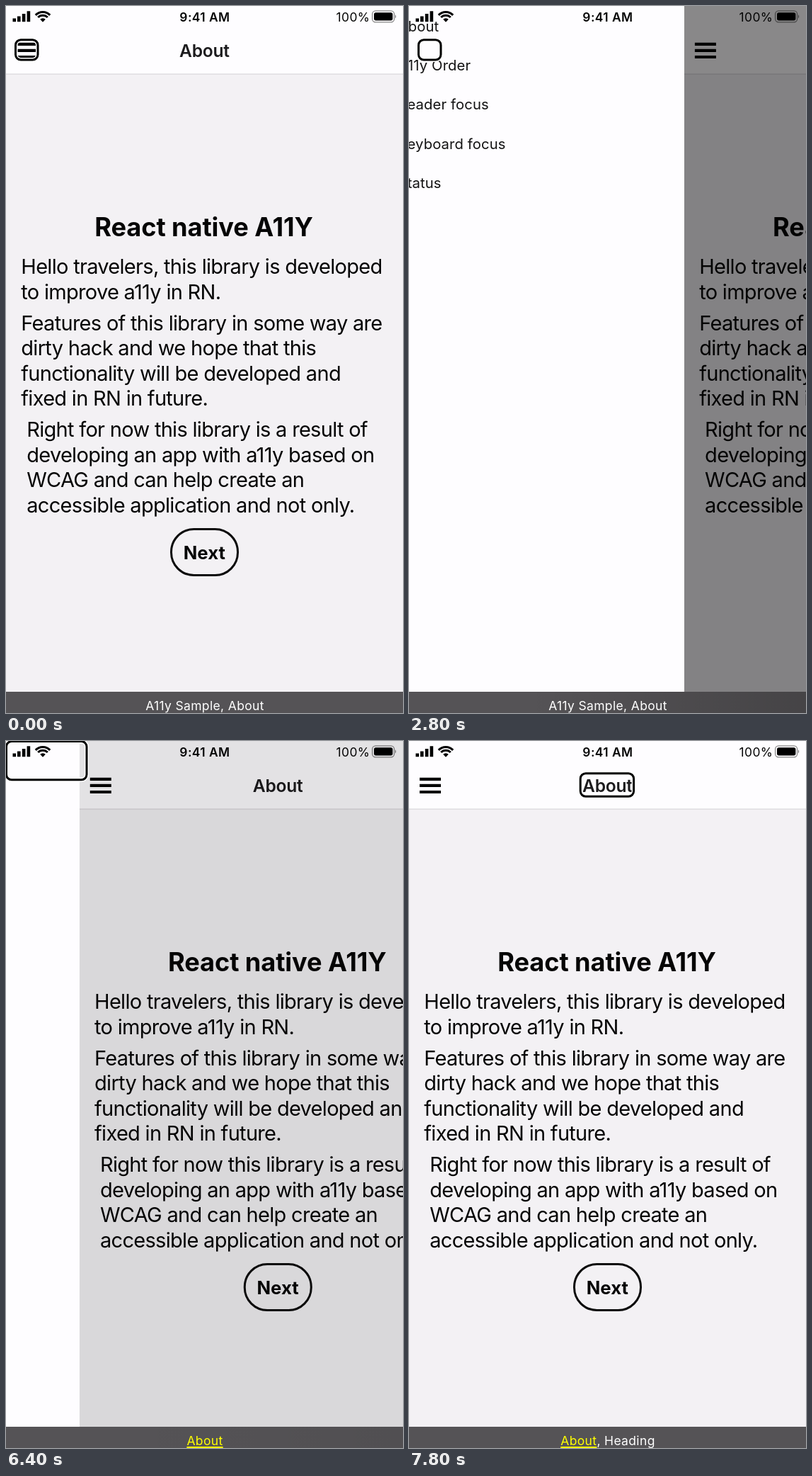
An HTML page for the animation above (8000 ms loop, 561 px wide and 998 px high).

```html
<!DOCTYPE html>
<html lang="en">
<head>
<meta charset="utf-8">
<title>Drawer menu with screen reader</title>
<style>
  html, body { margin: 0; width: 100%; height: 100%; overflow: hidden; }
  body { position: relative; font-family: Inter, Roboto, sans-serif; font-optical-sizing: none; }
  svg { position: absolute; left: 0; top: 0; width: 561px; height: 998px; }
  text { fill: #050505; }
  .mid { text-anchor: middle; }
  .title { font-size: 36.2px; font-weight: 700; letter-spacing: -.08px; }
  .head { font-size: 24.6px; font-weight: 600; letter-spacing: -.3px; fill: #1c1b1d; }
  .next { font-size: 25.7px; font-weight: 700; }
  .body { font-size: 29px; letter-spacing: -.7px; }
  .item { font-size: 20.3px; letter-spacing: .1px; fill: #141414; }
  .status { font-size: 17.4px; letter-spacing: .42px; }
  #bar {
    position: absolute; left: 0; top: 968px; width: 561px; height: 30px; overflow: hidden;
    background: #555356; color: #fff; text-align: center;
    font-size: 17.5px; line-height: 40px; letter-spacing: .35px;
  }
  #shade { position: absolute; inset: 0; background: linear-gradient(90deg, #0000 30%, #0003); }
  #caption { position: relative; left: .5px; white-space: pre; }
  u {
    color: #ff0; text-decoration-thickness: 1.5px;
    text-underline-offset: 1.5px; text-decoration-skip-ink: none;
  }
</style>
</head>
<body>
<svg viewBox="0 0 561 998">
  <rect width="561" height="998" fill="#fefdff"/>
  <g id="page">
    <rect width="561" height="998" fill="#f3f1f4"/>
    <rect width="561" height="96" fill="#fefdff"/>
    <rect y="95.5" width="561" height="1.2" fill="#dad8dc"/>
    <path d="M15 53.8h30M15 62.9h30M15 72h30" stroke="#000" stroke-width="4.2"/>
    <text class="mid head" x="280.3" y="72">About</text>
    <text class="mid title" x="279.5" y="325">React native A11Y</text>
    <g id="copy"></g>
    <rect x="233.5" y="738.5" width="94" height="65" rx="32" fill="none" stroke="#0a0a0a" stroke-width="3"/>
    <text class="mid next" x="280.3" y="781">Next</text>
    <rect id="dim" width="561" height="998"/>
  </g>
  <g id="drawer">
    <rect width="418.5" height="998" fill="#fefdff"/>
  </g>
  <g id="ring" fill="none">
    <rect rx="7.5" stroke="#fff" stroke-width="6"/>
    <rect rx="7.5" stroke="#000" stroke-width="3"/>
  </g>
  <g id="status">
    <path d="M9.5 17.6h4.6v4.6h-4.6zM16 14.6h4.6v7.6h-4.6zM22.8 11h4.6v11.2h-4.6zM29.6 7.3h4.6v14.9h-4.6z"/>
    <g fill="none" stroke="#000" stroke-width="3">
      <path d="M41.8 12.9a14 14 0 0 1 20.4 0M45.2 16.1a9.3 9.3 0 0 1 13.6 0"/>
    </g>
    <path d="M52 22.8l-3.8-4a5.3 5.3 0 0 1 7.6 0z"/>
    <text class="mid status" x="280.9" y="21.5" font-weight="600">9:41 AM</text>
    <text class="status" x="466.5" y="21.5">100%</text>
    <rect x="517.6" y="6.8" width="31" height="16" rx="4.5" fill="none" stroke="#0007" stroke-width="1.3"/>
    <rect x="520" y="9.2" width="26.4" height="11.2" rx="2.6"/>
    <path d="M550 12.2q2.4 2.6 0 5.2z" fill="#0008"/>
  </g>
</svg>
<div id="bar"><div id="shade"></div><div id="caption"></div></div>
<script>
const $ = id => document.getElementById(id);
const LOOP = 8000, STEP = 200, WIDTH = 418.5;

function addText(parent, cls, x, y, str) {
  const el = document.createElementNS('http://www.w3.org/2000/svg', 'text');
  el.setAttribute('class', cls);
  el.setAttribute('x', x);
  el.setAttribute('y', y);
  el.textContent = str;
  parent.append(el);
}

const paragraphs = [
  [21.3, 378, ['Hello travelers, this library is developed', 'to improve a11y in RN.']],
  [21.3, 457.6, ['Features of this library in some way are', 'dirty hack and we hope that this',
    'functionality will be developed and', 'fixed in RN in future.']],
  [29.2, 608, ['Right for now this library is a result of', 'developing an app with a11y based on',
    'WCAG and can help create an', 'accessible application and not only.']]
];
for (const [x, y, lines] of paragraphs)
  lines.forEach((line, i) => addText($('copy'), 'body', x, y + i * 35.6, line));
['About', 'A11y Order', 'Reader focus', 'Keyboard focus', 'Status']
  .forEach((name, i) => addText($('drawer'), 'item', 14.2, 35.5 + i * 55.4, name));

// Focus ring: start time, then x, y, width, height of the stroke's centre line
const rings = [
  [0, 13.5, 47.7, 31.5, 28.4],
  [3000, 412.3, 47.7, 31.5, 28.4],
  [4000],
  [5400, .5, .5, 417.7, 54.3],
  [6400, .5, .5, 113.5, 54.3],
  [7600, 13.5, 47.7, 31.5, 28.4],
  [7800, 242.2, 45.7, 75.4, 32.6]
];
// Spoken caption, the current word underlined
const captions = [
  [0, 'A11y Sample, About'],
  [4000, '<u>Main</u> menu'],
  [4600, 'Main <u>menu</u>'],
  [5400, '<u>About</u>'],
  [7600, '<u>Button</u>'],
  [7800, '<u>About</u>, Heading']
];
const current = (list, t) => list.findLast(entry => entry[0] <= t);

// Critically damped spring from 0 to 1
function spring(ms) {
  const k = Math.max(0, ms) * .016;
  return 1 - (1 + k) * Math.exp(-k);
}

let shown = '';
function draw(t) {
  const open = Math.max(0, spring(t - 2530) - spring(t - 6231));
  const x = WIDTH * open;
  $('page').setAttribute('transform', `translate(${x})`);
  $('drawer').setAttribute('transform', `translate(${x - WIDTH})`);
  $('dim').setAttribute('opacity', open ** 1.1 / 2);
  $('shade').style.opacity = open;

  const [, rx, ry, w, h] = current(rings, t);
  $('ring').style.display = w ? '' : 'none';
  if (w) for (const r of $('ring').children) {
    r.setAttribute('x', rx);
    r.setAttribute('y', ry);
    r.setAttribute('width', w);
    r.setAttribute('height', h);
  }

  const caption = current(captions, t)[1];
  if (caption !== shown) $('caption').innerHTML = shown = caption;
}

const start = performance.now();
function tick() {
  const t = (performance.now() - start) % LOOP;
  draw(Math.floor(t / STEP) * STEP);
  requestAnimationFrame(tick);
}
tick();
</script>
</body>
</html>
```
